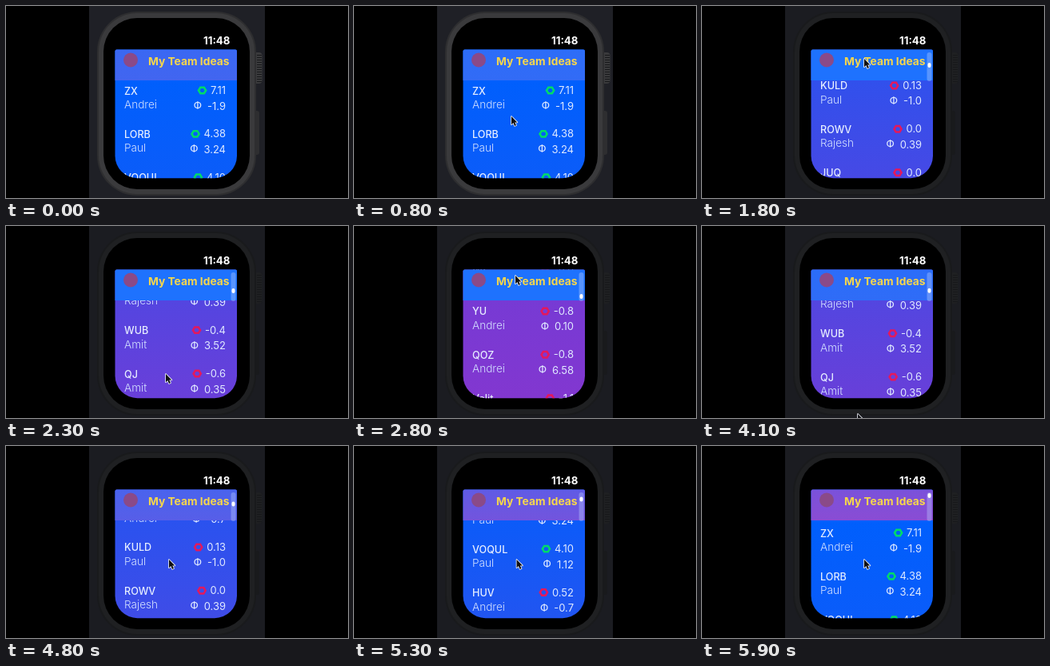
Animation, 428 px wide and 240 px high, one loop 6 s. Source, as an HTML page with a canvas:

```html
<!DOCTYPE html>
<html lang="en">
<head>
<meta charset="utf-8">
<title>My Team Ideas</title>
<style>
  html, body { margin: 0; width: 100%; height: 100%; overflow: hidden; background: #000; }
  canvas { display: block; width: 428px; height: 240px; }
</style>
</head>
<body>
<canvas id="stage" width="428" height="240"></canvas>
<script>
const ctx = document.getElementById('stage').getContext('2d');
const LOOP = 6000, STEP = 100, PITCH = 54.4, BOTTOM = 490;
const FONT = 'Inter, "Open Sans", sans-serif';
const BLUE = [0, 95, 253], PURPLE = [130, 55, 208];
const HEAD_BLUE = [30, 114, 254], HEAD_PURPLE = [138, 76, 212];

// ticker, member, change, score
const rows = `
  ZX Andrei 7.11 -1.9
  LORB Paul 4.38 3.24
  VOQUL Paul 4.10 1.12
  HUV Andrei 0.52 -0.7
  KULD Paul 0.13 -1.0
  ROWV Rajesh 0.0 0.39
  JUQ Rajesh 0.0 0.39
  WUB Amit -0.4 3.52
  QJ Amit -0.6 0.35
  YU Andrei -0.8 0.10
  QOZ Andrei -0.8 6.58
  Volit Paul -1.1 2.04
`.trim().split('\n').map(line => line.trim().split(' '));

// Pointer turning points: time, x, y
const turns = [
  [800, 197, 138], [1300, 199, 190], [1800, 203, 66], [2300, 200, 185],
  [2800, 202, 62], [4100, 195, 235], [4800, 204, 142], [5900, 203, 142]
];

const clamp = (v, lo = 0, hi = 1) => Math.min(hi, Math.max(lo, v));
const mix = (a, b, k) => a + (b - a) * k;
const blend = (a, b, k) => `rgb(${a.map((v, i) => Math.round(mix(v, b[i], clamp(k)))).join(',')})`;
const ease = k => (1 - Math.cos(Math.PI * k)) / 2;

// Scrolls down, rests at the end, then returns with a slight overshoot.
const scrollAt = t => Math.min(
  Math.max(0, 0.265 * (t - 956)), Math.max(-3, 0.222 * (5686 - t)), BOTTOM);

// How purple the header is.
const warmthAt = t => Math.max(0.3 - t / 6000, (t - 3800) / 2100, 0);

function pointerAt(t) {
  const i = Math.max(1, turns.findIndex(p => p[0] >= t));
  const [t0, x0, y0] = turns[i - 1], [t1, x1, y1] = turns[i];
  const k = ease((t - t0) / (t1 - t0));
  return [mix(x0, x1, k), mix(y0, y1, k)];
}

function box(x, y, w, h, r, fill) {
  ctx.beginPath();
  ctx.roundRect(x, y, w, h, r);
  ctx.fillStyle = fill;
  ctx.fill();
}

// Returns the width of the text.
function text(str, x, y, size, weight, fill, align = 'left') {
  ctx.font = `${weight} ${size}px ${FONT}`;
  ctx.textAlign = align;
  ctx.fillStyle = fill;
  ctx.fillText(str, x, y);
  return ctx.measureText(str).width;
}

function vertical(y0, y1, top, bottom) {
  const g = ctx.createLinearGradient(0, y0, 0, y1);
  g.addColorStop(0, top);
  g.addColorStop(1, bottom);
  return g;
}

function drawWatch(t) {
  const dim = clamp((t - 900) / 300);
  const metal = blend([58, 58, 60], [31, 32, 34], dim);
  const shade = blend([46, 46, 48], [25, 26, 28], dim);

  ctx.fillStyle = '#000';
  ctx.fillRect(0, 0, 428, 240);
  ctx.fillStyle = blend([31, 32, 38], [27, 28, 33], dim);
  ctx.fillRect(104, 0, 220, 240);

  box(306, 58, 14.5, 39, 4, metal);
  ctx.fillStyle = '#17181a';
  for (let y = 61; y < 95; y += 3) ctx.fillRect(314, y, 6, 1);
  box(307, 131, 10, 55, 3, shade);

  box(114, 7, 199, 230, 50, shade);
  box(116, 9, 195, 226, 48, metal);
  box(122, 15, 183, 214, 42, '#000');
  text('11:48', 280.5, 48, 13.3, 700, '#fff', 'right');
}

function drawBadge(x, y, up) {
  const d = up ? 1 : -1;
  ctx.strokeStyle = up ? '#00dc68' : '#e4185c';
  ctx.lineWidth = 2.5;
  ctx.beginPath();
  for (let i = 0; i < 6; i++) {
    const a = i * Math.PI / 3;
    ctx.lineTo(x + Math.cos(a) * 4.6 * d, y + Math.sin(a) * 4.3);
  }
  ctx.closePath();
  ctx.stroke();
}

function drawRow([ticker, member, change, score], y) {
  text(ticker, 148, y + 4.5, 12.6, 500, '#e6eeff');
  text(member, 148, y + 22, 13.6, 300, '#d3e0ff');
  const w1 = text(change, 275, y + 4, 13, 400, '#e0eaff', 'right');
  drawBadge(275 - w1 - 10.5, y - 0.5, change > 1);
  const w2 = text(score, 275, y + 23.5, 13, 400, '#e0eaff', 'right');
  text('Φ', 275 - w2 - 7, y + 22, 11.6, 500, '#e0eaff', 'right');
}

function drawScreen(t) {
  const offset = scrollAt(t), warmth = warmthAt(t);
  const tint = y => blend(BLUE, PURPLE, (offset + y) / BOTTOM);
  const head = k => blend(HEAD_BLUE, HEAD_PURPLE, k);

  ctx.save();
  ctx.beginPath();
  ctx.roundRect(136.5, 54.5, 152.5, 160.7, [2, 2, 28, 28]);
  ctx.clip();
  ctx.fillStyle = vertical(93, 215, tint(-40), tint(40));
  ctx.fillRect(136, 54, 154, 162);

  rows.forEach((row, i) => {
    const y = 106 + i * PITCH - offset;
    if (y > 50 && y < 230) drawRow(row, y);
  });

  ctx.fillStyle = vertical(55, 93, head(warmth * 0.85), head(warmth * 1.1));
  ctx.fillRect(136, 54, 154, 39);
  ctx.restore();

  ctx.beginPath();
  ctx.arc(156, 67.5, 9, 0, Math.PI * 2);
  ctx.fillStyle = '#8a4a88';
  ctx.fill();
  text('My Team Ideas', 279.5, 74, 13.8, 700, '#f6d64c', 'right');

  if (t > 956) {
    box(281.5, 58, 6, 36, 3, 'rgba(190,210,255,.36)');
    box(282.5, 59 + Math.max(0, offset) * 0.0533, 4, 6, 2, '#fff');
  }
}

function drawPointer(t) {
  if (t < turns[0][0]) return;
  ctx.save();
  ctx.translate(...pointerAt(t));
  ctx.scale(0.85, 0.85);
  const shape = [[0, 0], [0, 12], [2.8, 9.5], [4.8, 14], [7, 13], [5, 8.7], [8.6, 8.7]];
  ctx.beginPath();
  shape.forEach(([x, y]) => ctx.lineTo(x, y));
  ctx.closePath();
  ctx.lineJoin = 'round';
  ctx.lineWidth = 2;
  ctx.strokeStyle = '#e8ecf4';
  ctx.stroke();
  ctx.fillStyle = '#101014';
  ctx.fill();
  ctx.restore();
}

const start = performance.now();

function frame() {
  const elapsed = (performance.now() - start) % LOOP;
  const t = Math.floor(elapsed / STEP) * STEP;
  drawWatch(t);
  drawScreen(t);
  drawPointer(t);
  requestAnimationFrame(frame);
}

frame();
</script>
</body>
</html>
```
